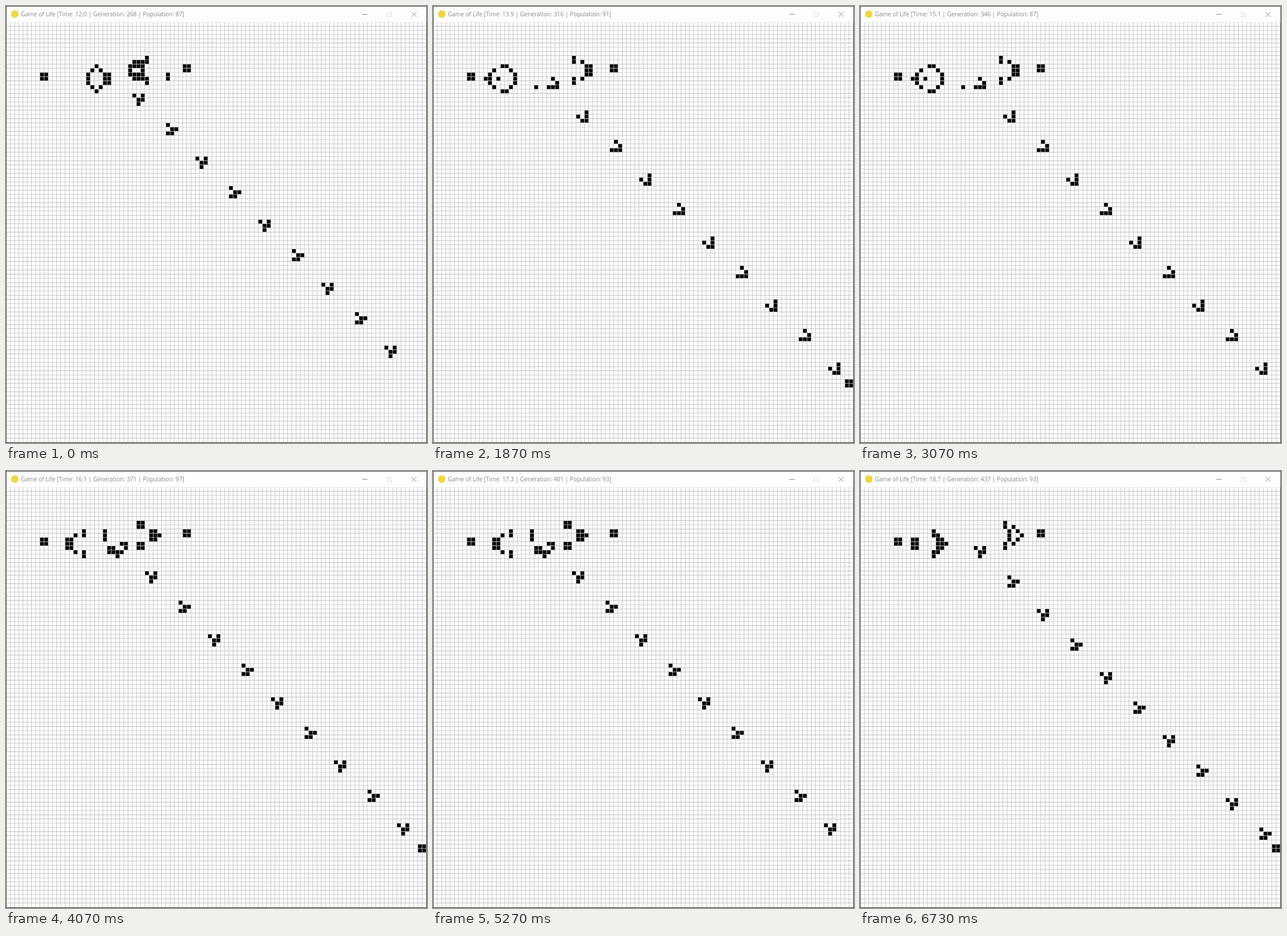
These frames come from a looping animation (735 px wide and 762 px high, 6800 ms). An HTML page with a canvas:

```html
<!DOCTYPE html>
<html lang="en">
<head>
<meta charset="utf-8">
<title>Game of Life</title>
<style>
  html, body { margin: 0; width: 100%; height: 100%; overflow: hidden; background: #fff; }
  canvas { display: block; }
</style>
</head>
<body>
<canvas id="stage" width="735" height="762"></canvas>
<script>
const ctx = document.getElementById('stage').getContext('2d');
const W = 735, H = 762, LOOP = 6800, FRAMES = 102;
const N = 100, PITCH = 8, CELL = 7, TOP = 31;
// the 802 x 832 window is shown slightly reduced
const SX = W / 802, SY = H / 832;

const GUN = [
  '........................#',
  '......................#.#',
  '............##......##............##',
  '...........#...#....##............##',
  '##........#.....#...##',
  '##........#...#.##....#.#',
  '..........#.....#.......#',
  '...........#...#',
  '............##'
];

// pace of the simulation: [frame, generation]
const PACE = [[0, 268.6], [11, 287], [16, 296], [28, 316], [44, 343], [46, 346],
  [55, 360], [61, 371], [79, 401], [88, 416], [101, 437]];
const CAPTION_LAG = 0.2; // the title is refreshed a little after the board

function seed() {
  const world = new Uint8Array(N * N);
  GUN.forEach((line, r) => [...line].forEach((ch, c) => {
    if (ch === '#') world[(r + 8) * N + c + 8] = 1;
  }));
  return world;
}

// everything beyond the edge is dead
function step(world) {
  const near = new Uint8Array(N * N);
  for (let r = 0; r < N; r++) for (let c = 0; c < N; c++) {
    if (!world[r * N + c]) continue;
    for (let y = Math.max(0, r - 1); y <= Math.min(N - 1, r + 1); y++)
      for (let x = Math.max(0, c - 1); x <= Math.min(N - 1, c + 1); x++)
        if (x !== c || y !== r) near[y * N + x]++;
  }
  return world.map((on, i) => near[i] === 3 || (on && near[i] === 2) ? 1 : 0);
}

const worlds = [];
const LAST = PACE[PACE.length - 1][1];
for (let gen = 1, world = seed(); gen <= LAST; gen++, world = step(world))
  worlds[gen] = world;

function generation(frame, lag = 0) {
  let i = 1;
  while (frame > PACE[i][0]) i++;
  const [f0, g0] = PACE[i - 1], [f1, g1] = PACE[i];
  return Math.round(g0 + (g1 - g0) * (frame - f0) / (f1 - f0) - lag);
}

const startOf = frame => Math.round(frame * 20 / 3) * 10;

function frameAt(ms) {
  let frame = Math.min(FRAMES - 1, Math.floor((ms + 5) * 15 / 1000));
  if (startOf(frame) > ms) frame--;
  return frame;
}

function caption(frame) {
  const gen = generation(frame, CAPTION_LAG);
  const time = (12 + startOf(frame) / 1000).toFixed(1);
  const population = worlds[gen].reduce((sum, on) => sum + on, 0);
  return `Game of Life [Time: ${time} | Generation: ${gen} | Population: ${population}]`;
}

function line(color, ...pts) {
  ctx.strokeStyle = color;
  ctx.lineWidth = 1;
  ctx.beginPath();
  for (let i = 0; i < pts.length; i += 4) {
    ctx.moveTo(pts[i], pts[i + 1]);
    ctx.lineTo(pts[i + 2], pts[i + 3]);
  }
  ctx.stroke();
}

function drawGrid(world) {
  const dead = new Path2D(), live = new Path2D();
  for (let r = 0; r < N; r++) for (let c = 0; c < N; c++)
    (world[r * N + c] ? live : dead).rect(1 + c * PITCH, TOP + r * PITCH, CELL, CELL);
  ctx.save();
  ctx.scale(SX, SY);
  ctx.fillStyle = '#c0c0c0';
  ctx.fillRect(1, TOP, N * PITCH, N * PITCH);
  ctx.fillStyle = '#fff';
  ctx.fill(dead);
  ctx.fillStyle = '#000';
  ctx.fill(live);
  ctx.restore();
}

function drawWindow(title) {
  ctx.fillStyle = '#f0d545';
  ctx.beginPath();
  ctx.arc(15.3, 14, 6.6, 0, Math.PI * 2);
  ctx.fill();

  ctx.fillStyle = '#858585';
  ctx.font = '10.2px "Open Sans", "Noto Sans", sans-serif';
  ctx.textBaseline = 'alphabetic';
  ctx.fillText(title, 26, 18.2);

  line('#858585', 622, 14.5, 631, 14.5);
  line('#8c8c8c', 708, 10.2, 716.6, 18.8, 716.6, 10.2, 708, 18.8);
  ctx.strokeStyle = '#dcdcdc';
  ctx.strokeRect(665.5, 11.5, 7, 7);
  ctx.strokeStyle = '#4c4c4c';
  ctx.strokeRect(0.5, 0.5, W - 1, H - 1);
}

function draw(frame) {
  ctx.fillStyle = '#fff';
  ctx.fillRect(0, 0, W, H);
  drawGrid(worlds[generation(frame)]);
  drawWindow(caption(frame));
}

let shown = -1;
function tick(now) {
  const frame = frameAt(now % LOOP);
  if (frame !== shown) draw(shown = frame);
  requestAnimationFrame(tick);
}
draw(0);
requestAnimationFrame(tick);
</script>
</body>
</html>
```
